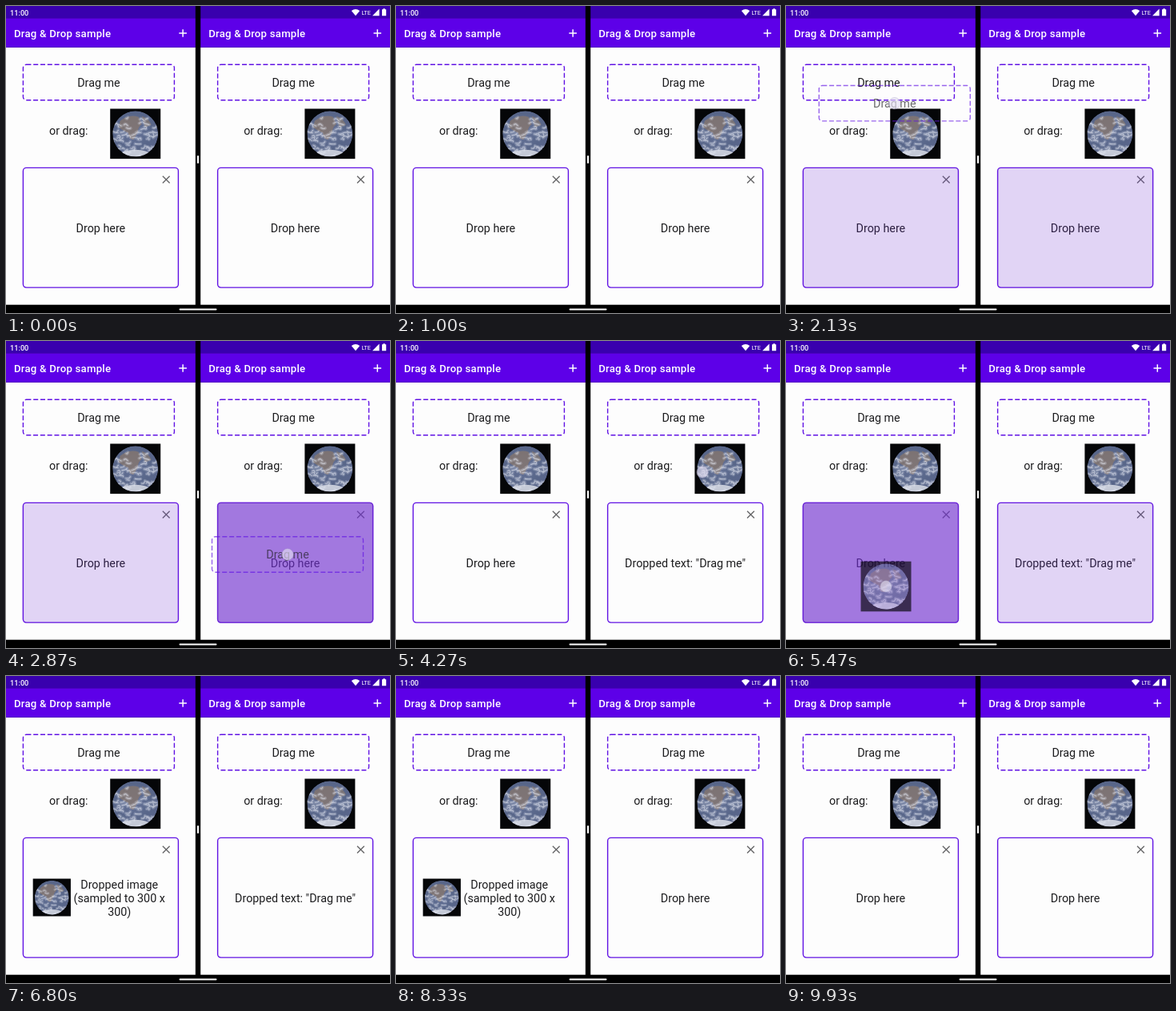
An HTML page that plays this animation: 480 by 384 pixels, repeating every 9990 ms.

```html
<!DOCTYPE html>
<html lang="en">
<head>
<meta charset="utf-8">
<title>Drag &amp; Drop sample</title>
<style>
  html, body { margin: 0; width: 100%; height: 100%; overflow: hidden; background: #000; }
  svg { display: block; width: 480px; height: 384px; }
  text { font: 14.3px Roboto, sans-serif; fill: #1c1c1e; }
  .mid { text-anchor: middle; }
  .title { font-size: 13.2px; font-weight: 500; letter-spacing: .22px; fill: #fff; }
  .clock { font-size: 9.2px; font-weight: 500; fill: #fff; }
  .net { font-size: 7.3px; fill: #fff; }
  .line { fill: none; stroke: #6112e4; stroke-width: 1.4; }
  .dash { stroke-dasharray: 6 2.8; }
  .plus { stroke: #fff; stroke-width: 1.5; }
  .cross { stroke: #656567; stroke-width: 1.35; }
  .tint { fill: #702ecf; }
  .cloud { fill: none; stroke: #e3e6f0; stroke-linecap: round; }
</style>
</head>
<body>
<svg viewBox="0 0 480 384" id="stage">
  <defs>
    <radialGradient id="sea" cx=".45" cy=".45" r=".56">
      <stop offset="0" stop-color="#68759a"/>
      <stop offset=".7" stop-color="#586689"/>
      <stop offset="1" stop-color="#59658a"/>
    </radialGradient>
    <clipPath id="disc"><circle r="28.5"/></clipPath>

    <g id="earth">
      <rect x="-31.5" y="-31.3" width="63" height="62.6" fill="#050608"/>
      <g clip-path="url(#disc)">
        <circle r="28.5" fill="url(#sea)"/>
        <path d="M-19-16Q-8-25 4-21L8-12Q3-8 3-2L-2 7Q-8 8-9-1Q-16-4-21-8Z" fill="#85766f" opacity=".8"/>
        <path d="M8-22Q17-19 20-11L12-8Z" fill="#887970" opacity=".7"/>
        <ellipse cy="26" rx="18" ry="6" fill="#d9dce6" opacity=".85"/>
        <path class="cloud" stroke-width="4" opacity=".24"/>
        <path class="cloud" stroke-width="1.1" opacity=".6"/>
      </g>
    </g>

    <g id="card">
      <rect class="line dash" x="-94.5" y="-22.2" width="189" height="44.4" rx="4"/>
      <text class="mid" y="5">Drag me</text>
    </g>

    <g id="pane">
      <rect y="51.8" width="236.8" height="321.9" fill="#fdfdfd"/>
      <rect width="236.8" height="15.2" fill="#3900ae"/>
      <rect y="15.2" width="236.8" height="36.6" fill="#5d00e8"/>
      <text class="title" x="10" y="39">Drag &amp; Drop sample</text>
      <path class="plus" d="M216.3 34h9.6M221.1 29.2v9.6"/>
      <use href="#card" x="115.9" y="95.5"/>
      <text x="54" y="160.5">or drag:</text>
      <use href="#earth" x="161.7" y="159.8"/>
      <rect class="line" x="21.4" y="202.4" width="194" height="149.7" rx="4"/>
      <path class="cross" d="M195.8 212.8l8.8 8.8M204.6 212.8l-8.8 8.8"/>
    </g>
  </defs>

  <g id="panes"></g>

  <text class="clock" x="5" y="11.6">11:00</text>
  <path d="M431.8 6Q437 2 442.2 6L437 12.3Z" fill="#fff"/>
  <text class="net" x="444.4" y="11">LTE</text>
  <path d="M458 12.2h8.6V3.6Z" fill="#fff"/>
  <path d="M470 4.3h1.4V3.3h2.4v1h1.4v8h-5.2Z" fill="#fff"/>

  <rect x="239" y="187" width="2" height="10" rx="1" fill="#fff"/>
  <rect x="216.5" y="378.4" width="47" height="2" rx="1" fill="#fff"/>

  <circle id="ripple" fill="#000"/>
  <use id="textGhost" href="#card" opacity=".65"/>
  <use id="imageGhost" href="#earth" opacity=".66"/>
  <circle id="touch" r="7.2" fill="#e4dff2" fill-opacity=".65" stroke="#a49cc4" stroke-opacity=".35"/>
</svg>

<script>
const LOOP = 9990;
const $ = id => document.getElementById(id);
const clamp = v => Math.max(0, Math.min(1, v));
const show = (el, on) => el.setAttribute('display', on ? 'inline' : 'none');
const place = (el, [x, y]) => el.setAttribute('transform', `translate(${x.toFixed(2)} ${y.toFixed(2)})`);

// Touch gestures: a drag passes through [time, x, y] points after a long press.
const drags = [
  { ghost: $('textGhost'), down: 1400, up: 2930,
    path: [[1860, 116, 97], [2130, 135.5, 121.5], [2740, 352, 267]] },
  { ghost: $('imageGhost'), down: 4000, up: 5670,
    path: [[4330, 383, 164], [4730, 189.5, 233], [5320, 125, 307]] }
];
const taps = [
  { at: [443.2, 217.2], down: 7800, up: 7930 },
  { at: [200.2, 217.2], down: 8730, up: 8860 }
];
const [textDrag, imageDrag] = drags;
const [rightTap, leftTap] = taps;

// Wispy clouds from a small seeded generator, denser to the south.
let seed = 11;
const rnd = () => (seed = seed * 16807 % 2147483647) / 2147483647;
const span = (lo, hi) => (lo + rnd() * (hi - lo)).toFixed(1);
let wisps = '';
for (let i = 0; i < 60; i++) {
  const a = rnd() * 6.28, r = 28 * Math.sqrt(rnd());
  const x = r * Math.cos(a) - 3, y = r * Math.sin(a) + 5;
  wisps += `M${x.toFixed(1)} ${y.toFixed(1)}q${span(1, 5)} ${span(-4, 2)} ${span(2, 7)} ${span(-4, 4)}`;
}
document.querySelectorAll('.cloud').forEach(el => el.setAttribute('d', wisps));

const line = (x, y, s) => `<text class="mid" x="${x}" y="${y}">${s}</text>`;
const droppedImage = `<use href="#earth" transform="translate(57.3 277) scale(.75)"/>` +
  ['Dropped image', '(sampled to 300 x', '300)']
    .map((s, i) => line(141.7, 266 + i * 16.9, s)).join('');

const makePane = (x, result) => {
  const g = document.createElementNS('http://www.w3.org/2000/svg', 'g');
  g.setAttribute('transform', `translate(${x})`);
  g.innerHTML = `<use href="#pane"/><g>${line(118.4, 283, 'Drop here')}</g><g>${result}</g>
    <rect class="tint" x="20.7" y="201.7" width="195.4" height="151.1" rx="4.5"/>`;
  $('panes').append(g);
  const [, hint, full, tint] = g.children;
  return { x, hint, full, tint };
};
const left = makePane(0, droppedImage);
const right = makePane(243.2, line(118.4, 283, 'Dropped text: "Drag me"'));

// Smooth curve through three points, at rest at both ends.
function along([a, b, c], t) {
  if (t <= a[0]) return a.slice(1);
  if (t >= c[0]) return c.slice(1);
  const first = t < b[0], p = first ? a : b, q = first ? b : c;
  const h = q[0] - p[0], s = (t - p[0]) / h, ease = s * s * (3 - 2 * s);
  return [1, 2].map(k => {
    const slope = (c[k] - a[k]) / (c[0] - a[0]) * h;
    const bend = first ? s * s * (s - 1) : s * (1 - s) * (1 - s);
    return p[k] + (q[k] - p[k]) * ease + slope * bend;
  });
}

function setPane(pane, filled, pointer) {
  show(pane.hint, !filled);
  show(pane.full, filled);
  show(pane.tint, pointer);
  if (!pointer) return;
  const x = pointer[0] - pane.x, y = pointer[1];
  const over = x > 21 && x < 216 && y > 202 && y < 353;
  pane.tint.setAttribute('opacity', over ? .64 : .2);
}

function draw(t) {
  let pointer = null, dot = null;
  for (const d of drags) {
    const pos = along(d.path, t);
    const held = t >= d.path[0][0] && t < d.up;
    if (t >= d.down && t < d.up) dot = pos;
    if (held) pointer = pos;
    show(d.ghost, held);
    place(d.ghost, pos);
  }

  const ripple = $('ripple');
  let active = false;
  for (const p of taps) {
    if (t >= p.down && t < p.up) dot = p.at;
    if (t < p.down || t > p.up + 300) continue;
    active = true;
    place(ripple, p.at);
    ripple.setAttribute('r', 8 + 14 * clamp((t - p.down) / 220));
    ripple.setAttribute('opacity', .12 * (1 - clamp((t - p.up) / 300)));
  }
  show(ripple, active);

  show($('touch'), dot);
  if (dot) place($('touch'), dot);
  setPane(left, t >= imageDrag.up && t < leftTap.up, pointer);
  setPane(right, t >= textDrag.up && t < rightTap.up, pointer);
}

const start = performance.now();
function tick() {
  draw((performance.now() - start) % LOOP);
  requestAnimationFrame(tick);
}
tick();
</script>
</body>
</html>
```
